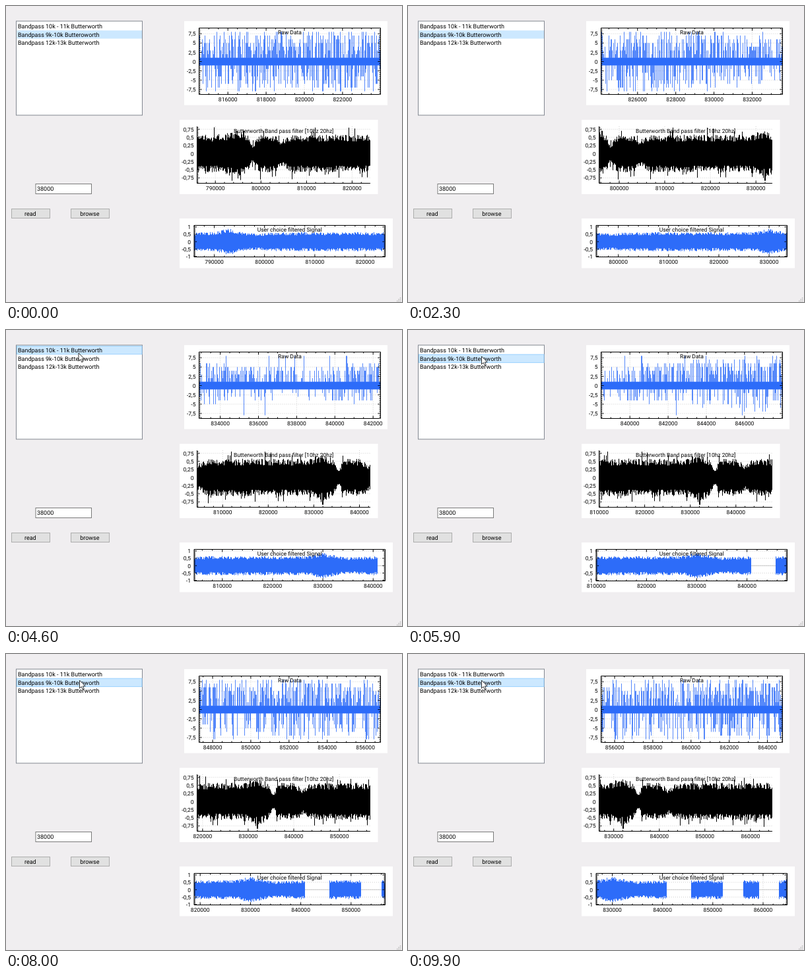
An HTML page that plays this animation: 600 px wide and 450 px high, repeating every 10 s.

```html
<!DOCTYPE html>
<html lang="en">
<head>
<meta charset="utf-8">
<title>Live filter plots</title>
<style>
  html, body { margin: 0; width: 100%; height: 100%; overflow: hidden; background: #f0eef0; }
  svg { display: block; width: 600px; height: 450px; }
  text { font: 9px Roboto, "Open Sans", sans-serif; fill: #000; text-rendering: geometricPrecision; }
  .plot text { font-size: 8.5px; }
</style>
</head>
<body>
<svg id="stage" viewBox="0 0 600 450"></svg>
<script>
const stage = document.getElementById("stage");
const LOOP = 10000, FRAME = 100;
// Sample positions are in thousands; new samples arrive in chunks
const START = 823.99, CHUNK = 0.8, CHUNK_TIME = 9900 / 51, PERIOD = 37.2;
const TOGGLES = [21, 27, 35, 40, 44, 49]; // chunks at which the selected filter changes
const BLUE = "#2d6cf9";

function add(parent, tag, attrs, text) {
  const el = document.createElementNS("http://www.w3.org/2000/svg", tag);
  for (const key in attrs) el.setAttribute(key, attrs[key]);
  if (text !== undefined) el.textContent = text;
  parent.appendChild(el);
  return el;
}
const rect = (parent, x, y, width, height, fill, stroke = "none") =>
  add(parent, "rect", { x, y, width, height, fill, stroke });
const label = (parent, x, y, text, anchor = "start") =>
  add(parent, "text", { x, y, "text-anchor": anchor }, text);

function noise(i, seed) {
  let h = Math.imul(i + seed * 7919, 0x9E3779B1);
  h = Math.imul(h ^ (h >>> 15), 0x85EBCA6B);
  h = Math.imul(h ^ (h >>> 13), 0xC2B2AE35);
  return ((h ^ (h >>> 16)) >>> 0) / 4294967296;
}
const bump = (x, center, width) => Math.exp(-(((x - center) / width) ** 2));
const phase = x => (x - 786) % PERIOD;
const selectedRow = chunk => TOGGLES.filter(c => c <= chunk).length % 2 ? 0 : 1;

// Each signal gives the highest and lowest value of one pixel column
function rawSpan(i, x) {
  const quiet = bump(x, 838, 5.5);
  const spike = (seed, chance, size) => {
    if (noise(i, seed) < .025) return 8;
    if (noise(i, seed + 1) > chance) return 1;
    return Math.round(1 + (size - 1) * noise(i, seed + 2) ** .7);
  };
  return [spike(1, .75 - .3 * quiet, 8 - 3 * quiet), -spike(4, .48 - .3 * quiet, 8 - 4.5 * quiet)];
}
function bandSpan(i, x) {
  const p = phase(x);
  const env = .5 + .12 * bump(p, 8.5, 2) - .27 * bump(p, 12.2, .8) - .15 * bump(p, 18.8, 1.2);
  const side = seed => {
    const burst = noise(i, seed + 2) < .07 ? .2 * noise(i, seed + 4) + .08 : 0;
    return Math.min(.84, env * (.74 + .42 * noise(i, seed)) + burst);
  };
  return [side(11), -side(12)];
}
function choiceSpan(i, x) {
  if (x > START && selectedRow((x - START) / CHUNK) === 0) return null;
  const p = phase(x);
  const env = .55 + .2 * bump(p, 7, 2) - .07 * bump(p, 12.5, 2.5);
  const side = seed => env * (.78 + .4 * noise(i, seed));
  return [side(21), -side(22)];
}

function makePlot(o) {
  const { left, right, top, bottom, zero, unit, span, boxed, color } = o;
  const scale = (right - left) / span;
  const yOf = v => zero - v * unit;
  const g = add(stage, "g", { class: "plot" });
  rect(g, ...o.panel, "#fff");

  const sub = o.yStep / 5;
  const line = (attrs) => add(g, "path", { fill: "none", ...attrs });
  const dotted = { stroke: "#cfcfcf", "stroke-dasharray": "1 2" };
  let rows = "", yTicks = "";
  for (let n = Math.ceil((zero - bottom) / unit / sub); yOf(n * sub) >= top; n++) {
    const y = yOf(n * sub), major = n % 5 === 0, len = major ? 4 : 2;
    yTicks += `M${left} ${y}h${len}`;
    if (boxed) yTicks += `M${right} ${y}h${-len}`;
    if (!major) continue;
    rows += `M${left} ${y}H${right}`;
    label(g, left - 5, y + 3.2, String(+(n * sub).toFixed(2)).replace(".", ","), "end");
  }
  line({ d: rows, ...dotted });
  const columns = line(dotted);
  line({ d: `M${left} ${zero}H${right}`, stroke: "#c8c8c8" });
  const signal = line({ stroke: color, "stroke-opacity": o.alpha });
  line({ d: `M${left} ${zero}H${right}`, stroke: color, "stroke-width": 2 * o.core * unit });

  const axes = boxed ? `M${left} ${top}H${right}V${bottom}H${left}Z` : `M${left} ${top}V${bottom}H${right}`;
  line({ d: axes + yTicks, stroke: "#000" });
  const xTicks = line({ stroke: "#000" });
  const names = Array.from({ length: 5 }, () => label(g, 0, bottom + 10.4, "", "middle"));
  label(g, (left + right) / 2, top + 9.5, o.title, "middle");

  return end => {
    const begin = end - span, cell = .99 / scale, minor = o.step / o.divisions;
    const xOf = x => left + (x - begin) * scale;
    let d = "";
    for (let i = Math.ceil(begin / cell); i * cell <= end; i++) {
      const s = o.sample(i, i * cell);
      if (s) d += `M${Math.floor(xOf(i * cell)) + .5} ${yOf(s[0]).toFixed(1)}V${yOf(s[1]).toFixed(1)}`;
    }
    signal.setAttribute("d", d);

    let ticks = "", grid = "", used = 0;
    names.forEach(name => name.textContent = "");
    for (let n = Math.ceil(begin / minor); n * minor <= end; n++) {
      const x = xOf(n * minor).toFixed(1), major = n % o.divisions === 0, len = major ? 4 : 2;
      ticks += `M${x} ${bottom}v${-len}`;
      if (boxed) ticks += `M${x} ${top}v${len}`;
      if (!major) continue;
      grid += `M${x} ${top}V${bottom}`;
      names[used].setAttribute("x", x);
      names[used++].textContent = Math.round(n * minor * 1000);
    }
    xTicks.setAttribute("d", ticks);
    columns.setAttribute("d", grid);
  };
}

// Filter list
const ROW = 12.8, LIST_TOP = 24.4;
rect(stage, 15.5, 23, 191, 143, "#fff", "#828790");
const rowBoxes = ["Bandpass 10k - 11k Butterworth", "Bandpass 9k-10k Butteroworth", "Bandpass 12k-13k Butterworth"]
  .map((name, i) => {
    const y = LIST_TOP + i * ROW;
    const box = rect(stage, 16.5, y, 189.5, 12.4, "none");
    label(stage, 18, y + 9.4, name);
    return box;
  });

// Input, buttons and size grip
rect(stage, 45, 270.5, 84.5, 15, "#fff", "#7a7a7a");
label(stage, 47, 281.3, "38000");
[[8.5, "read"], [98.5, "browse"]].forEach(([x, name]) => {
  rect(stage, x, 308.5, 58, 14, "#e1e1e1", "#adadad");
  label(stage, x + 28.3, 318.7, name, "middle");
});
for (let r = 0; r < 3; r++)
  for (let c = 2 - r; c < 3; c++) rect(stage, 592 + c * 2.4, 443 + r * 2.4, 1.5, 1.5, "#bdbcbd");

const filtered = { span: 38, step: 10, divisions: 5, alpha: 1, core: 0 };
const plots = [
  {
    title: "Raw Data", panel: [270, 23, 308, 127.7], left: 292.5, right: 567.5, top: 33.5, bottom: 134.5,
    zero: 84.5, unit: 5.65, yStep: 2.5, span: 9.5, step: 2, divisions: 4,
    boxed: true, color: BLUE, alpha: .8, core: 1, sample: rawSpan
  },
  {
    ...filtered, title: "Butterworth Band pass filter [10hz 20hz]", panel: [263, 173, 300.5, 113],
    left: 289.5, right: 552, top: 183, bottom: 269.5, zero: 224.3, unit: 49.3, yStep: .25,
    boxed: false, color: "#000", sample: bandSpan
  },
  {
    ...filtered, title: "User choice filtered Signal", panel: [263, 323, 323, 75.5],
    left: 285, right: 574.5, top: 333.5, bottom: 381.5, zero: 358.3, unit: 22.4, yStep: .5,
    boxed: true, color: BLUE, sample: choiceSpan
  }
].map(makePlot);

const cursor = add(stage, "path", {
  d: "M0 0V12.2L2.8 9.6L4.8 14L6.8 13.1L4.9 8.9H8.7Z", fill: "#fff", stroke: "#000", "stroke-width": .8
});
const ENTER = 2700;
const ease = (t, from, to) => {
  const f = Math.min(1, Math.max(0, (t - from) / (to - from)));
  return f * f * (3 - 2 * f);
};

// Enters from above, rests below the list, moves to the first row, then alternates between two rows
function cursorAt(t) {
  const enter = ease(t, ENTER, 3100), climb = ease(t, 3500, 3900), settle = ease(t, 4700, 5000);
  const dips = [2, 4].reduce((sum, i) => sum + bump(t, (TOGGLES[i] - .5) * CHUNK_TIME, 120), 0);
  return [
    185 - 42 * enter - 33 * climb + 1.5 * settle,
    12 + 59.5 * enter - 36.5 * climb + 5 * settle - 7 * dips
  ];
}

let shownChunk = -1;
function render(time) {
  const t = Math.floor((time % LOOP) / FRAME) * FRAME;
  const chunk = Math.floor(t / CHUNK_TIME + .22);
  if (chunk !== shownChunk) {
    plots.forEach(draw => draw(START + chunk * CHUNK));
    shownChunk = chunk;
  }

  const [x, y] = cursorAt(t), visible = t >= ENTER;
  cursor.setAttribute("visibility", visible ? "visible" : "hidden");
  cursor.setAttribute("transform", `translate(${x} ${y})`);

  const selected = selectedRow(chunk + 1);
  const hovered = visible && x < 206 ? Math.floor((y - LIST_TOP) / ROW) : -1;
  rowBoxes.forEach((box, i) => {
    box.setAttribute("fill", i === selected ? "#cce8ff" : i === hovered ? "#e5f3ff" : "none");
    box.setAttribute("stroke", i === selected && i === hovered ? "#99d1ff" : "none");
  });
}

const origin = performance.now();
function tick() {
  render(performance.now() - origin);
  requestAnimationFrame(tick);
}
tick();
</script>
</body>
</html>
```
